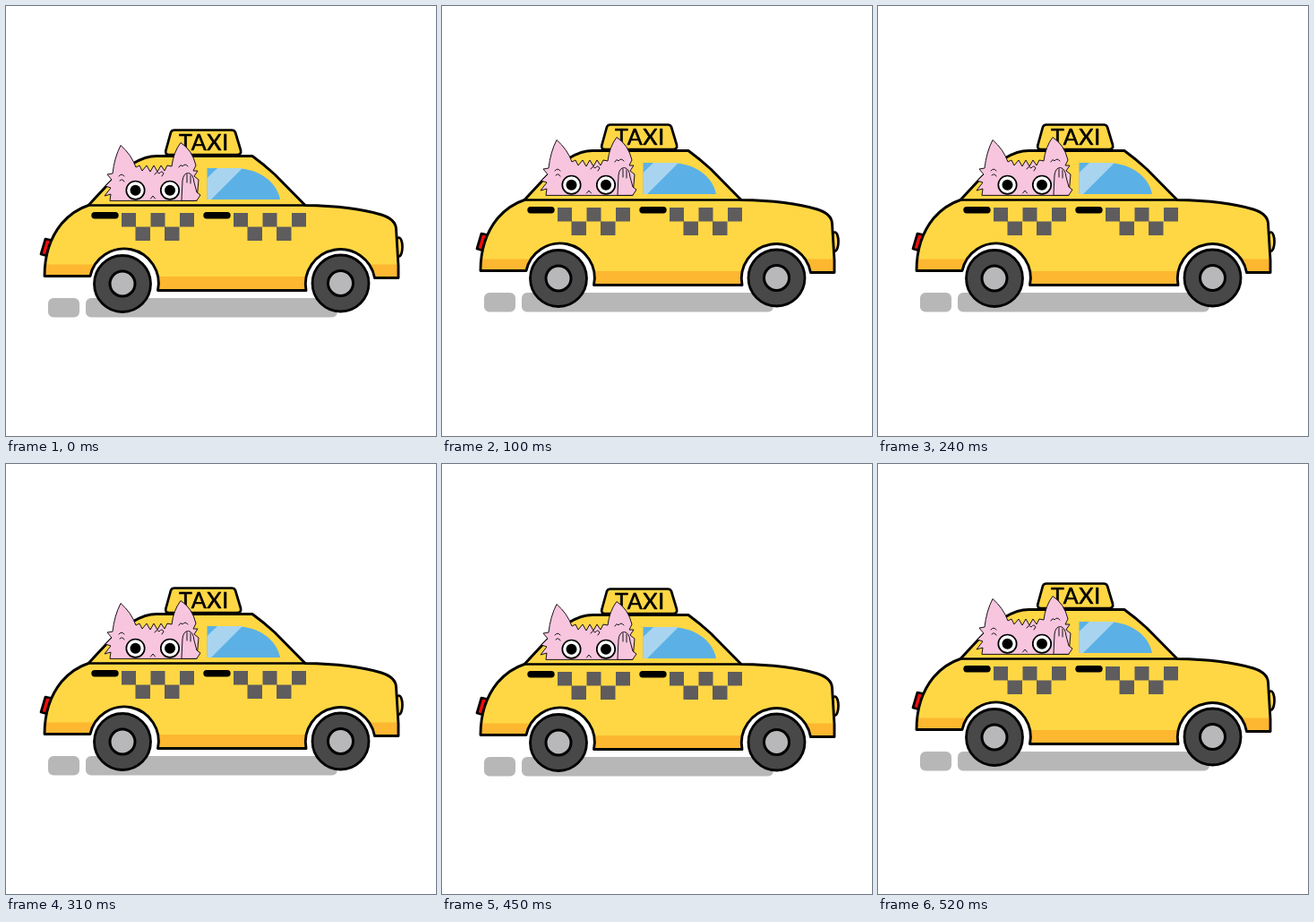
These frames come from a looping animation (480x480 px, 0.59 s). An HTML page:

```html
<!DOCTYPE html>
<html lang="en">
<head>
<meta charset="utf-8">
<title>Taxi</title>
<style>
html, body { margin: 0; width: 100%; height: 100%; overflow: hidden; background: #fff; }
svg { display: block; width: 100%; height: 100%; }
</style>
</head>
<body>
<svg viewBox="0 0 480 480">
  <defs>
    <path id="shell" d="M43 301.500C43 280 49 259 62 243Q75 228 92 222.500L112 201C128 184 148 167.500 168 167.500H275Q288 177 300 188L334 222.500C370 223 396 226 419 233Q435 238 435.500 249L438 290V303.500H411.500A38.500 38.500 0 0 0 335 317.500H169.500A38.500 38.500 0 0 0 94 301.500Z"/>
    <clipPath id="inside"><use href="#shell"/></clipPath>
    <g id="wheel" stroke="#000">
      <circle r="31.500" fill="#484848" stroke-width="2.800"/>
      <circle r="14" fill="#b8b8ba" stroke-width="3"/>
    </g>
    <path id="checks" fill="#5e5c5d" d="M0 0h16v15.500h-16zM32.500 0h16v15.500h-16zM65 0h16v15.500h-16zM15.500 15.500h16.500v15.500h-16.500zM48 15.500h16.500v15.500h-16.500z"/>
    <g id="eye">
      <circle r="10.200" fill="#fff" stroke="#000" stroke-width="1.700"/>
      <circle r="6" fill="#000"/>
    </g>
  </defs>
  <g id="taxi" stroke-linejoin="round" stroke-linecap="round">
    <g fill="#b7b7b8">
      <rect x="47" y="326" width="35" height="21.500" rx="6"/>
      <rect x="89" y="326" width="281" height="21.500" rx="6"/>
    </g>
    <g stroke="#000" stroke-width="2.700">
      <path fill="#f20d0d" d="M44 260L51 261.500 46 279 39 277Z"/>
      <ellipse cx="438.500" cy="269" rx="4" ry="10.500" fill="#ffd744"/>
      <path fill="#ffd744" d="M188 138.500H252Q255 138.500 256 141L262 161Q263 166 258 166H182Q177 166 178.500 161L184 141Q185 138.500 188 138.500Z"/>
    </g>
    <text x="193" y="160.500" font-family="Lato, sans-serif" font-size="25" letter-spacing=".7" stroke="#000" stroke-width=".6">TAXI</text>

    <use href="#shell" fill="#ffd744"/>
    <path clip-path="url(#inside)" fill="#fdb730" d="M40 288.500H100V302H40ZM160 302H345V318H160ZM400 288.500H440V304H400Z"/>
    <use href="#shell" fill="none" stroke="#000" stroke-width="2.900"/>

    <path fill="#5bb1e5" d="M224.500 181H257C283 182 302 196 306 216H224.500Z"/>
    <path fill="#a9d4ef" d="M236 181H264L229 216H224.500V192Z"/>

    <g stroke="#171216" stroke-width="1" fill="#f8c5de">
      <path d="M116 217L117 210 110 212 117 203 111 201 118 194 113 188 119 187Q121 169 128 155.500Q140 166 145 180L149 178 152 184 157 178 161 185 165 178 169 185 173 178 177 184 180 178 185 179Q187 163 195 152.500Q208 161 212 178L209 184 214 184 210 190 215 194 213 217Z"/>
      <path d="M196 217L197 195Q198 186.500 203.500 186.500Q209 187 210 197L213 208 217 211 213 217Z"/>
      <path fill="none" d="M202 188V197M206 189V198M126 190q3-4 6 0M127 195q3-3 5 1M166 188q2-4 5-1q3-4 5 0l-2 3M193 180q2-4 4-1q3-4 6 0M161.500 215l2.500-3 2.500 3"/>
    </g>
    <use href="#eye" x="144.500" y="205.700"/>
    <use href="#eye" x="183" y="205.700"/>

    <path d="M92 222.500H334" stroke="#000" stroke-width="2.600"/>
    <path d="M99 233.800H122M224 233.800H247" stroke="#000" stroke-width="7.400"/>
    <use href="#checks" x="129" y="231"/>
    <use href="#checks" x="254" y="231"/>

    <use href="#wheel" x="130" y="310"/>
    <use href="#wheel" x="373.500" y="309.500"/>
  </g>
</svg>
<script>
const taxi = document.getElementById('taxi');
const loop = 590, hold = 100, step = 70;
const bounce = [0, -6, -9, -6, 0, 5, 1, -5];

function draw(now) {
  const t = now % loop;
  const pose = t < hold ? 0 : 1 + Math.floor((t - hold) / step);
  taxi.setAttribute('transform', `translate(0 ${bounce[pose]})`);
}

const start = performance.now();
function tick() {
  draw(performance.now() - start);
  requestAnimationFrame(tick);
}
tick();
</script>
</body>
</html>
```
